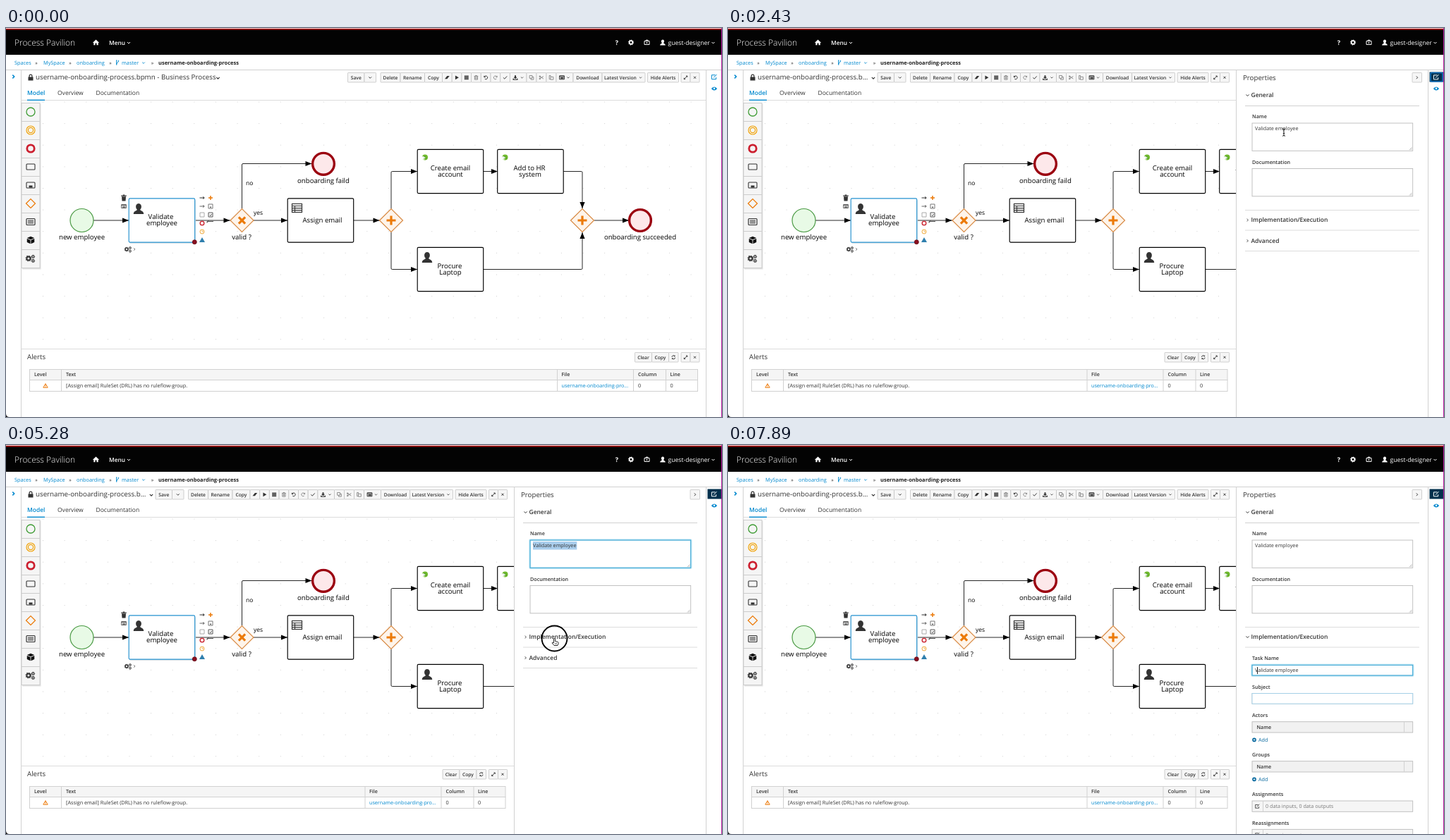
These frames come from a looping animation (1015 px wide and 552 px high, 8000 ms). An HTML page:

```html
<!DOCTYPE html>
<html lang="en">
<head>
<meta charset="utf-8">
<title>Process editor</title>
<style>
html, body { margin: 0; width: 100%; height: 100%; overflow: hidden; background: #fff; }
svg { display: block; width: 1015px; height: 552px; font-family: "Open Sans", "Noto Sans", sans-serif; }
text { white-space: pre; text-rendering: geometricPrecision; }
</style>
</head>
<body>
<svg id="stage" viewBox="0 0 1015 552"></svg>
<script>
const BLUE = '#0088ce', INK = '#333', FAINT = '#888', EDGE = '#d1d1d1', ORANGE = '#ec7a08';
const LOOP = 8000;

// Basic shapes
const text = (x, y, s, size = 7.3, fill = INK, weight = 400, anchor = 'start') =>
  `<text x="${x}" y="${y}" font-size="${size}" fill="${fill}" font-weight="${weight}" text-anchor="${anchor}">${s}</text>`;
const rect = (x, y, w, h, fill = '#fff', stroke = 'none', sw = 1, rx = 0) =>
  `<rect x="${x}" y="${y}" width="${w}" height="${h}" fill="${fill}" stroke="${stroke}" stroke-width="${sw}" rx="${rx}"/>`;
const line = (d, stroke = EDGE, sw = 1) => `<path d="${d}" fill="none" stroke="${stroke}" stroke-width="${sw}"/>`;
const circle = (x, y, r, fill, stroke = 'none', sw = 1) =>
  `<circle cx="${x}" cy="${y}" r="${r}" fill="${fill}" stroke="${stroke}" stroke-width="${sw}"/>`;
const group = (id, body, extra = '') => `<g id="${id}" ${extra}>${body}</g>`;

// Icons centred on 0,0; a leading ~ marks an outline
const ICONS = {
  home: 'M-4.6 .4L0-4 4.6 .4H3.2V3.8H1V1H-1V3.8H-3.2V.4Z',
  user: 'M-3.8 4C-3.8 1.6-1.6 1.8-1.1 .7C-2.6-.6-2.4-4 0-4S2.6-.6 1.1 .7C1.6 1.8 3.8 1.6 3.8 4Z',
  down: '~M-2-1L0 1 2-1', right: '~M-1-2L1 0-1 2',
  lock: 'M-3.5-.5H-2.5V-2A2.5 2.5 0 0 1 2.5-2V-.5H3.5V4.5H-3.5ZM-1.3-.5H1.3V-2A1.3 1.3 0 0 0-1.3-2Z',
  case: '~M-3.5-2H3.5V3H-3.5ZM-1.3-2V-3.4H1.3V-2M-.9 .5H.9M0-.4V1.4',
  branch: '~M-1.3 3V-3M1.5-2.5C1.5 .5-1.3 0-1.3 2M-2-3H-.6M-2 3H-.6M.9-2.6H2.1',
  eraser: 'M-3.5 2L0-2.5H3.5L0 2Z', play: 'M-2.2-3L3 0-2.2 3Z',
  grid: 'M-3-3H-1.2V-1.2H-3ZM-.9-3H.9V-1.2H-.9ZM1.2-3H3V-1.2H1.2ZM-3-.9H-1.2V.9H-3ZM-.9-.9H.9V.9H-.9ZM1.2-.9H3V.9H1.2ZM-3 1.2H-1.2V3H-3ZM-.9 1.2H.9V3H-.9ZM1.2 1.2H3V3H1.2Z',
  trash: '~M-3-2H3M-1-2V-3H1V-2M-2.2-2V3H2.2V-2M-.7-.8V2M.7-.8V2',
  bin: 'M-3.8-3.5H-1.3V-4.4H1.3V-3.5H3.8V-2.3H-3.8ZM-3-1.7H3L2.5 4.4H-2.5Z',
  undo: '~M-2.4-2.6V-.6H-.4M-2.2-.8A2.5 2.5 0 1 1-1.4 2', redo: '~M2.4-2.6V-.6H.4M2.2-.8A2.5 2.5 0 1 0 1.4 2',
  check: '~M-2.8 0L-.8 2 2.8-2', save: 'M-1-3H1V-.6H2.6L0 2-2.6-.6H-1ZM-3.5 1.5H-2V2.4H2V1.5H3.5V3.4H-3.5Z',
  copy: '~M-3-3H1V1H-3ZM1-1H3V3H-1V1', cut: '~M-3-2L3 1.8M-3 2L3-1.8M-3-2.4H-1.6V-1H-3ZM-3 1H-1.6V2.4H-3Z',
  paste: '~M-1-1V-3H-3V2.5H-1M-1-1H3V3H-1Z', list: '~M-3.4-2.5H3.4V2.5H-3.4ZM-3.4-1.4H3.4M-2 .2H2.4M-2 1.4H2.4',
  expand: '~M-2.4 2.4L2.4-2.4M.5-2.4H2.4V-.5M-2.4 .5V2.4H-.5', close: '~M-1.6-1.6L1.6 1.6M-1.6 1.6L1.6-1.6',
  refresh: '~M-2.4-.4A2.4 2.4 0 0 1 2-1.6V-2.8M2-1.5H.6M2.4 .4A2.4 2.4 0 0 1-2 1.6V2.8M-2 1.5H-.6',
  edit: '~M1.5-2.8H-3.6V3.2H2.6V.5M-1 .9L3.6-3.5', eye: 'M-4.2 0Q0-5 4.2 0Q0 5-4.2 0ZM-1.3-.2A1.3 1.3 0 1 0 1.3-.2 1.3 1.3 0 1 0-1.3-.2Z',
  cube: 'M0-5L5-2.8 0-.6-5-2.8ZM-5-2L-.4 0V5L-5 2.8ZM5-2L.4 0V5L5 2.8Z',
  arrow: '~M-3.5 0H3M1-1.6L3.2 0 1 1.6', plus: '~M-3 0H3M0-3V3', box: '~M-3-3H3V3H-3Z',
  boxed: '~M-3-3H3V3H-3ZM-1.4 .3L0 1.6 1.6-1', warn: '~M0-2.8L3.2 2.7H-3.2ZM0-1V1M0 1.5V2.1'
};
const DISABLED = ['trash', 'redo', 'copy', 'cut', 'paste'];
const icon = (name, x, y, color = INK, k = 1, sw = 1) => {
  const d = ICONS[name], open = d[0] === '~';
  return `<path transform="translate(${x} ${y}) scale(${k})" d="${open ? d.slice(1) : d}" fill-rule="evenodd" ` +
    (open ? `fill="none" stroke="${color}" stroke-width="${sw}"/>` : `fill="${color}"/>`);
};
const gear = (x, y, r, c) => circle(x, y, r * .6, 'none', c, r * .45) +
  `<circle cx="${x}" cy="${y}" r="${r * .9}" fill="none" stroke="${c}" stroke-width="${r * .3}" stroke-dasharray="${r * .35}"/>`;
const gears = (x, y, k) => gear(x - 2 * k, y, 3.2 * k, INK) + gear(x + 3 * k, y - 2 * k, 2 * k, INK) + gear(x + 3 * k, y + 2.6 * k, 2 * k, INK);

function header() {
  return rect(0, 0, 1015, 38, '#030303') + rect(0, 1, 1015, 1.6, '#a80f12') + rect(0, 0, 1015, 1, '#f3dcdc') +
    text(12, 25, 'Process Pavilion', 12, '#fff', 300) + icon('home', 127.5, 20.5, '#fff') +
    text(146, 23.5, 'Menu', 8.3, '#fff', 600) + icon('down', 174, 21, '#fff') +
    text(866, 24, '?', 9, '#fff', 700, 'middle') + gear(886, 20.5, 3.8, '#fff') + icon('case', 908.5, 20.5, '#fff') +
    icon('user', 931, 20.5, '#fff') + text(938.5, 23.5, 'guest-designer', 8.6, '#fff') + icon('down', 1002.5, 21, '#fff') +
    ['Spaces', 'MySpace', 'onboarding', 'master'].map((s, i) => text([12, 53, 100, 164][i], 52, s, 7.35, BLUE)).join('') +
    [43, 91, 148, 207.5].map(x => text(x, 51.5, '»', 7, INK, 400, 'middle')).join('') +
    icon('branch', 158, 49, BLUE) + icon('down', 195, 49.5, BLUE, .9) +
    text(216, 52, 'username-onboarding-process', 7.5, '#222', 700) +
    line('M0 59.5H1014M21.5 59.5V552M992.5 59.5V552') + icon('right', 10.5, 69, BLUE, 1.2, 1.3);
}

const button = (x, w, label, y = 63.5) => rect(x, y, w, 13.5, '#f6f6f6', '#c4c4c4', .8, .6) +
  (ICONS[label] ? icon(label, x + w / 2, y + 6.8, DISABLED.includes(label) ? FAINT : INK, .95)
    : text(x + w / 2, y + 9.3, label, 6.7, INK, 600, 'middle'));

// Parts of the main area that move with its right edge
function chrome(id, shift, title, chevron) {
  const icons = ['eraser', 'play', 'grid', 'trash', 'undo', 'redo', 'check'];
  const toolbar = button(484.5, 23.5, 'Save') + button(508, 16.5, 'down') +
    button(531, 28, 'Delete') + button(559, 34.5, 'Rename') + button(593.5, 25, 'Copy') +
    icons.map((n, i) => button(618.5 + i * 13.7, 13.7, n)).join('') +
    button(714.4, 23.6, '') + icon('save', 722, 70.3) + icon('down', 731.5, 70.3, INK, .8) +
    ['copy', 'cut', 'paste'].map((n, i) => button(738 + i * 14, 14, n)).join('') +
    button(780, 24, '') + icon('list', 788, 70.3) + icon('down', 797, 70.3, INK, .8) +
    button(804, 41, 'Download') + button(845, 61, '') + text(848, 72.8, 'Latest Version', 6.7, INK, 600) + icon('down', 899.5, 70.3, INK, .8) +
    button(909.5, 44, 'Hide Alerts') + button(957, 13, 'expand') + button(970, 13, 'close');
  const end = 980.5 - shift;
  const table = rect(33.5, 484.5, end - 33.5, 15, '#f5f5f5', EDGE) + rect(33.5, 499.5, end - 33.5, 16, '#fff', EDGE) +
    line('M78.5 484.5V515.5') + text(40, 494.3, 'Level', 7.1, INK, 600) + text(85, 494.3, 'Text', 7.1, INK, 600) +
    icon('warn', 56, 507.5, ORANGE) + text(85, 510.3, '[Assign email] RuleSet (DRL) has no ruleflow-group.', 7.25);
  const columns = line('M781.5 484.5V515.5M889.5 484.5V515.5M935.5 484.5V515.5') +
    [[787.5, 'File'], [896, 'Column'], [941.5, 'Line']].map(([x, s]) => text(x, 494.3, s, 7.1, INK, 600)).join('') +
    text(787.5, 510.3, 'username-onboarding-pro...', 7.2, BLUE) + text(896, 510.3, '0') + text(941.5, 510.3, '0');
  const actions = button(891.5, 24, 'Clear', 460.5) + button(915.5, 24, 'Copy', 460.5) + button(939.5, 13.5, 'refresh', 460.5) +
    button(957, 13, 'expand', 460.5) + button(970, 13, 'close', 460.5);
  return group(id, text(42, 73.3, title, 9.75) + icon('down', chevron, 71, INK, 1.1) + table +
    `<g transform="translate(${-shift} 0)">${toolbar + columns + actions}</g>`);
}

const head = (x, y, dx, dy) => `<path d="M${x} ${y}L${x - 9 * dx - 3.6 * dy} ${y - 9 * dy - 3.6 * dx}L${x - 9 * dx + 3.6 * dy} ${y - 9 * dy + 3.6 * dx}Z"/>`;
const label = (x, y, s) => text(x, y, s, 9.65, '#000', 400, 'middle');
const task = (x, y, stroke = '#000') => rect(x, y, 93.5, 62.2, '#fff', stroke, 1.15, 1.5);
const gateway = (x, turn) => `<path d="M${x - 16.5} 273L${x} 256.5 ${x + 16.5} 273 ${x} 289.5Z" fill="#fef4ea" stroke="#d98b45" stroke-width="1.2"/>` +
  `<path transform="translate(${x} 273) rotate(${turn})" d="M-6.5 0H6.5M0-6.5V6.5" stroke="${ORANGE}" stroke-width="3.2"/>`;
const endEvent = (x, y) => circle(x, y, 15.4, '#fde8ea', '#9b0010', 3.4);
const service = (x, y) => circle(x, y, 4, '#6fb92c') + circle(x - 2, y + .8, 2.4, '#fff') + line(`M${x - 2} ${y - 1}H${x + 1}M${x - 2} ${y + 1.4}H${x + 2}`, '#3f8f1f', .8);

function diagram() {
  let dots = '';
  for (let x = 52; x < 990; x += 30.62)
    for (let y = 104.5; y < 452; y += 30.62) dots += rect(x.toFixed(1), y.toFixed(1), 1, 1, '#d0d0d0');
  const wires = 'M124 273H174M268 273H318M334.5 256.5V194Q334.5 192.5 336 192.5H433M351 273H399M492 273H530' +
    'M546 256.5V205Q546 203.5 547.5 203.5H583M546 289.5V341Q546 342.5 547.5 342.5H583M676 203.5H697' +
    'M790 203.5H815.5Q817 203.5 817 205V256M676 342.5H815.5Q817 342.5 817 341V290M834 273H883';
  const heads = [[174, 273], [317.5, 273], [433.5, 192.5], [399, 273], [529.5, 273], [583, 203.5], [583, 342.5], [697, 203.5], [883, 273]];
  const tools = icon('bin', 167, 241) + icon('list', 167, 253, '#666') + icon('arrow', 278, 241) + icon('plus', 290, 241, ORANGE, 1, 1.5) +
    icon('arrow', 278, 253, '#666') + icon('box', 290, 253, '#777') + rect(289.3, 253.5, 1.5, 1.5, INK) +
    icon('box', 278, 265, '#aaa') + icon('boxed', 290, 265, '#555') + circle(278, 277, 2.8, '#fff', '#cc303b', 1.5) +
    line('M285 276V274.5H294M287 273L285 276.5', '#555') + circle(278, 289, 3, '#fff', '#f0ab3c') + line('M278 287.2V289H280', '#f0ab3c', .8) +
    '<path d="M278 297L282 304H274Z" fill="#2f7fae"/>' + gears(173, 314, 1) + icon('right', 182, 314, INK, .8);
  return dots + line(wires, '#000', .85) + heads.map(([x, y]) => head(x, y, 1, 0)).join('') + head(817, 256, 0, 1) + head(817, 290, 0, -1) +
    circle(107.5, 273, 16.5, '#e8fae6', '#4b9b45', 1.2) + label(107.5, 300, 'new employee') +
    rect(175, 243.5, 94, 62.5, '#e2e6e9', 'none', 1, 2) + task(174.2, 241.9, '#2391cf') + icon('user', 188, 256.5, INK, 1.9) +
    label(219.5, 271.2, 'Validate') + label(221, 280, 'employee') + circle(267.3, 303.7, 3, '#8b1020', '#5d0612', .8) +
    gateway(334.5, 45) + label(334, 300, 'valid ?') + text(340, 223, 'no', 8.5, '#000') + text(351, 265.3, 'yes', 8.5, '#000') +
    endEvent(450, 192.8) + label(450, 219.8, 'onboarding faild') +
    task(399.2, 241.9) + rect(405.5, 249.5, 14, 12, '#fff', INK, 1.2) + line('M405.5 252.5H419.5M405.5 255.6H419.5M405.5 258.6H419.5M409.5 252.5V261.5', INK, 1.1) +
    label(448.5, 276, 'Assign email') + gateway(546, 0) + task(583.2, 172.4) + service(594, 183.5) +
    label(630, 201.7, 'Create email') + label(630, 210.8, 'account') + task(696.7, 172.4) + service(707.5, 183.5) +
    label(742, 201.7, 'Add to HR') + label(743, 210.8, 'system') + task(583.2, 311.4) + icon('user', 597, 325.5, INK, 1.9) +
    label(629, 340.6, 'Procure') + label(630, 349.6, 'Laptop') + gateway(817, 0) + endEvent(899, 273) + label(899, 300, 'onboarding succeeded') + tools;
}

function palette() {
  const cell = i => 119 + 26 * i;
  const art = [
    circle(35, cell(0), 6, 'none', '#3f9c35', 1.3),
    circle(35, cell(1), 6, 'none', '#f0a30a', 1.2) + circle(35, cell(1), 3.6, 'none', '#f0a30a', 1.2),
    circle(35, cell(2), 5.2, 'none', '#cc1f2f', 2.8),
    rect(29, cell(3) - 4, 12, 8, 'none', INK, 1.1, 1),
    rect(29, cell(4) - 4, 12, 8, 'none', INK, 1.1, 1) + rect(32.5, cell(4) + .5, 5, 3, INK),
    `<path d="M28.5 ${cell(5)}L35 ${cell(5) - 6.5} 41.5 ${cell(5)} 35 ${cell(5) + 6.5}Z" fill="none" stroke="${ORANGE}" stroke-width="1.2"/>`,
    rect(29, cell(6) - 4.5, 12, 9, 'none', INK, 1.2, 1) + line(`M31 ${cell(6) - 2}H39M31 ${cell(6)}H39M31 ${cell(6) + 2}H39`, INK, 1),
    icon('cube', 35, cell(7), '#111', 1.05), gears(34.5, cell(8), 1.3)
  ];
  return rect(23, 107.5, 26.5, 235, '#e2e2e2') + rect(22, 106.5, 26, 234, '#f5f5f5', '#ccc') +
    art.map((a, i) => a + (i ? line(`M22 ${cell(i) - 12.5}H48`, '#ccc') : '')).join('');
}

const caption = (y, s) => text(743, y, s, 7.2, INK, 600);
const field = (y, h, fill = '#fff') => rect(743, y, 227.7, h, fill, '#bbb', .9);
const grip = y => line(`M966 ${y}L969.5 ${y - 3.5}M968 ${y}L969.5 ${y - 1.5}`, FAINT, .6);
const section = (y, s) => text(741.5, y, s, 8.45, INK, 600);
const focusBox = (id, y, h) => group(id, rect(742.5, y - .5, 228.7, h + 1, 'none', '#c4e8f5', 2.6, 1) + rect(743, y, 227.7, h, 'none', '#35a3d3', 1), 'opacity="0"');

function panel() {
  const list = (y, s) => caption(y, s) + field(y + 6.7, 15.3, '#f1f1f1') + line(`M958.5 ${y + 6.7}v15.3`) +
    text(749.5, y + 17, 'Name', 7.1, INK, 600) + circle(746, y + 32.4, 2.8, '#00659c') + icon('plus', 746, y + 32.4, '#fff', .5, 1.6) + text(752, y + 35, 'Add', 7.2, '#00659c');
  const data = (y, s, value) => caption(y, s) + field(y + 6.7, 15.3, '#f5f5f5') + line(`M758.5 ${y + 6.7}v15.3`) + icon('edit', 750.5, y + 14.4, INK, .8) +
    text(762, y + 17, value, 7.2, '#777');
  const details = caption(305, 'Task Name') + field(312.3, 14.7) + focusBox('taskFocus', 312.3, 14.7) + text(747, 322.4, 'Validate employee', 7.2) +
    caption(345.5, 'Subject') + field(352.5, 14.7) + group('subjectHover', rect(743, 352.5, 227.7, 14.7, '#fff', '#9fcfe8', .9)) +
    list(386, 'Actors') + list(442, 'Groups') + data(498.3, 'Assignments', '0 data inputs, 0 data outputs') +
    data(538.7, 'Reassignments', '0 reassignments') + group('caret', rect(0, 315, .9, 10, '#111'));
  return group('panel', rect(720.5, 59.5, 272, 500, '#fff', EDGE) + text(730, 73.5, 'Properties', 9.7) + button(970, 13.5, 'right') +
    icon('down', 736.5, 95.5) + section(98.4, 'General') + line('M733 110.5H980') + caption(128, 'Name') + field(135, 39.3) +
    focusBox('nameFocus', 135, 39.3) + '<rect id="selection" y="137" height="11.5" fill="#a9cdec"/>' + text(747, 145.3, 'Validate employee', 7.2) + grip(173) +
    caption(192.5, 'Documentation') + field(199.5, 39.3) + grip(237.5) + line('M733 258.5H980M733 287H980', '#dcdcdc') +
    group('closedMark', icon('right', 736.5, 272.5, INK, .9)) + group('openMark', icon('down', 736.5, 272.5)) + section(275.4, 'Implementation/Execution') +
    `<clipPath id="reveal"><rect id="revealBox" x="721" y="288" width="271"/></clipPath><g clip-path="url(#reveal)">${details}</g>` +
    group('advanced', icon('right', 736.5, 302, INK, .9) + section(305, 'Advanced') + line('M733 316.5H980', '#dcdcdc')));
}

const pointers = group('arrow', '<path d="M0 0V9L2.1 7.1 3.6 10.2 5.1 9.5 3.7 6.5H6.5Z" fill="#000" stroke="#fff" stroke-width=".8"/>') +
  group('hand', '<path d="M-1 .6Q0-.6 1 .6V4L5 5Q6 5.3 5.5 7.5L4.5 10H-.5L-3.5 6.3Q-3.3 5-1 6.3Z" fill="#fff" stroke="#111" stroke-width=".9"/><path d="M1.2 6.3V8.5M2.9 6.3V8.5" stroke="#111" stroke-width=".6"/>') +
  group('beam', line('M-2-5Q0-5 0-3.8Q0-5 2-5M0-4V4.5M-2 5.3Q0 5.3 0 4Q0 5.3 2 5.3M-1.2 1.5H1.2', '#111', .9));

document.getElementById('stage').innerHTML = rect(0, 0, 1015, 552) + header() + diagram() + palette() +
  icon('lock', 35, 70) + line('M21.5 102.5H992M21.5 455.5H992', '#dcdcdc') +
  text(30, 95, 'Model', 8.45, BLUE, 600) + text(73, 95, 'Overview', 8.5) + text(127.5, 95, 'Documentation', 8.5) + line('M30 102.3H55', BLUE, 1.4) +
  rect(22, 456, 970, 96) + text(30, 470, 'Alerts', 9.7) +
  chrome('wide', 0, 'username-onboarding-process.bpmn - Business Process', 300.5) +
  chrome('narrow', 272.5, 'username-onboarding-process.b...', 206) + panel() +
  group('dockIdle', icon('edit', 1004, 69.5, BLUE)) + group('dockOpen', rect(994.5, 62.5, 19.5, 14, '#00304d') + icon('edit', 1004, 69.7, '#fff')) +
  group('dockFocus', rect(996, 63.5, 17, 12.5, 'none', '#1674c4', 1.5, 1)) + icon('eye', 1004, 86, BLUE) +
  group('tip', rect(939, 60, 49, 18, '#292e34', 'none', 1, .6) + '<path d="M988 65.5L992 69 988 72.5Z" fill="#292e34"/>' + text(963, 72, 'Properties', 7.3, '#fff', 400, 'middle')) +
  group('cursor', '<circle id="ring" fill="none" stroke="#000" stroke-width="1.9"/>' + pointers) +
  rect(1014, 0, 1, 552, '#b5179e') + '<path d="M0 547Q0 552 5 552H0Z" fill="#111"/>';

const el = {};
document.querySelectorAll('[id]').forEach(n => el[n.id] = n);
const show = (id, on) => el[id].setAttribute('display', on ? 'inline' : 'none');
const set = (id, name, value) => el[id].setAttribute(name, value);
const ramp = (t, from, to) => Math.min(1, Math.max(0, (t - from) / (to - from)));
const smooth = p => p * p * (3 - 2 * p);

// Pointer stops: time, x, y
const PATH = [[240, 1015, 50], [500, 1002, 69], [1140, 1002, 69], [1560, 992, 97], [1650, 992, 97], [2430, 788, 148],
  [2820, 776, 138.5], [4350, 776, 138.5], [5130, 777.5, 274.5], [5730, 777.5, 274.5], [6360, 757, 320], [6690, 757, 320], [7290, 765, 359]];
const CLICKS = [870, 2970, 3270, 3570, 3960, 5280, 6480];
// Pointer shape from a given time on
const SHAPES = [[0, 'arrow'], [440, 'hand'], [1230, 'arrow'], [2190, 'beam'], [4560, 'arrow'], [5040, 'hand'], [5970, 'arrow'], [6180, 'beam']];

function pointerAt(t) {
  const i = PATH.findIndex(p => p[0] > t);
  if (i < 0) return PATH[PATH.length - 1].slice(1);
  const [a, b] = [PATH[Math.max(0, i - 1)], PATH[i]], p = smooth(ramp(t, a[0], b[0]));
  return [a[1] + (b[1] - a[1]) * p, a[2] + (b[2] - a[2]) * p];
}

function draw(t) {
  const opened = t >= 1050;
  show('panel', opened); show('narrow', opened); show('wide', !opened);
  show('dockOpen', opened); show('dockIdle', !opened);
  show('dockFocus', t >= 840 && t < 3060);
  set('tip', 'opacity', ramp(t, 510, 660) * (1 - ramp(t, 1230, 1380)));

  set('nameFocus', 'opacity', ramp(t, 3030, 3180) * (1 - ramp(t, 6540, 6660)));
  const from = t < 3300 ? 776.5 : 747;
  set('selection', 'x', from);
  set('selection', 'width', t >= 3060 && t < 6540 ? 809.3 - from : 0);

  const grow = smooth(ramp(t, 5370, 5520));
  set('revealBox', 'height', 270 * grow);
  set('advanced', 'transform', `translate(0 ${270 * grow})`);
  show('openMark', t >= 5370); show('closedMark', t < 5370);

  set('taskFocus', 'opacity', ramp(t, 6570, 6750));
  show('subjectHover', t >= 7140);
  show('caret', t >= 6600 && t < 7485 || t >= 7800);
  set('caret', 'transform', `translate(${t < 7800 ? 809.2 : 750} 0)`);

  const [x, y] = pointerAt(t);
  show('cursor', t >= 240 && t < 7800);
  set('cursor', 'transform', `translate(${x} ${y})`);
  const shape = SHAPES.filter(s => s[0] <= t).pop()[1];
  ['arrow', 'hand', 'beam'].forEach(s => show(s, s === shape));
  const click = CLICKS.find(c => t >= c && t < c + 205);
  show('ring', click !== undefined);
  if (click !== undefined) set('ring', 'r', 18 - 8.5 * (t - click) / 180);
}

const start = performance.now();
function frame() {
  draw((performance.now() - start) % LOOP);
  requestAnimationFrame(frame);
}
frame();
</script>
</body>
</html>
```
